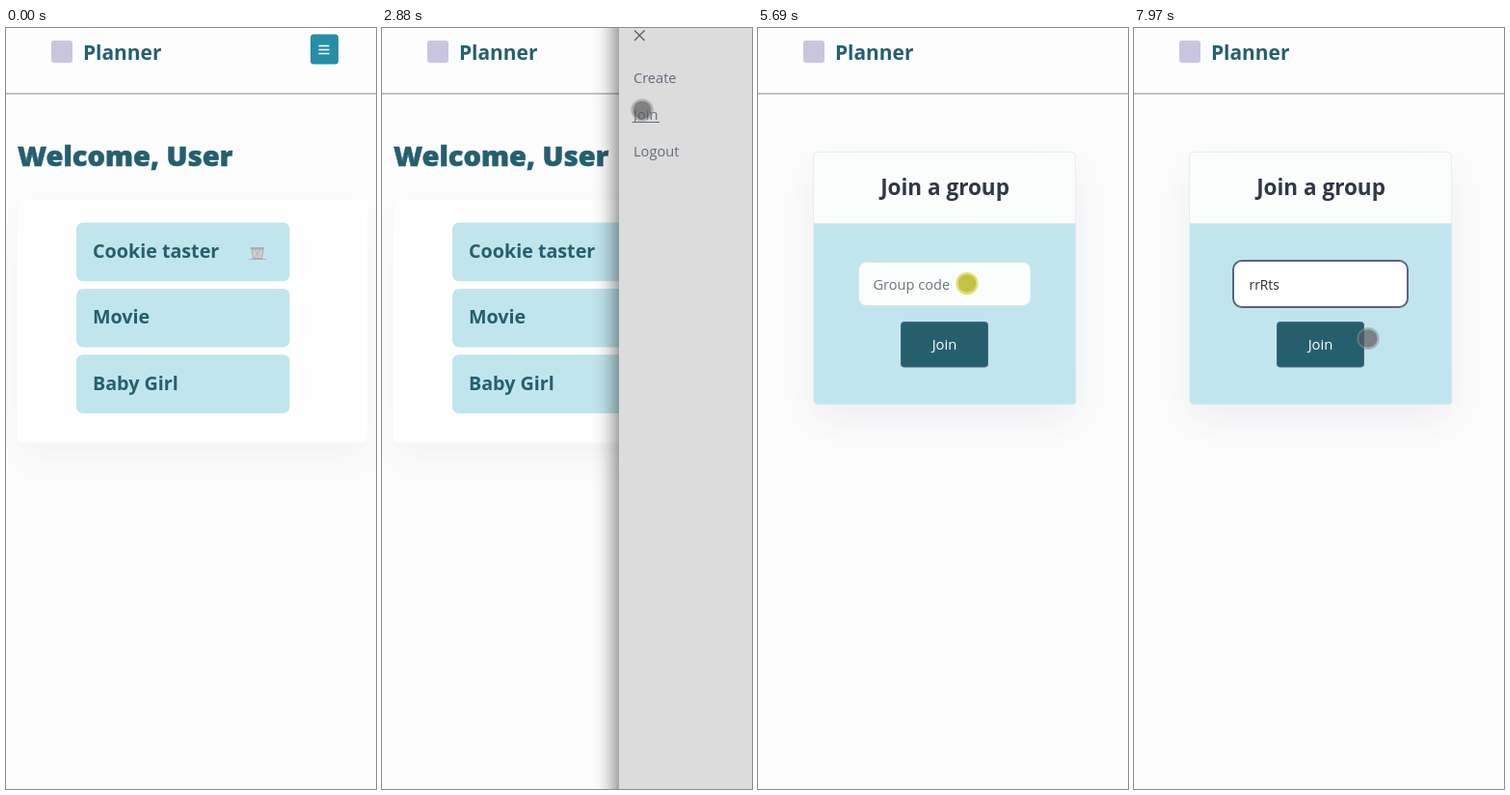
These frames come from a looping animation (384x788 px, 8000 ms). An HTML page:

```html
<!DOCTYPE html>
<html lang="en">
<head>
<meta charset="utf-8">
<title>Planner</title>
<style>
  html, body { margin: 0; width: 100%; height: 100%; overflow: hidden; background: #fdfdfd; }
  svg { display: block; width: 384px; height: 788px; font-family: "Open Sans", "Noto Sans", sans-serif; }
  .bold { font-weight: 700; fill: #255f6e; }
  .title { font-size: 29px; font-weight: 800; stroke: #255f6e; stroke-width: .6; }
  .item { font-size: 19.7px; }
  .menu { font-size: 14.6px; fill: #626c7c; }
  .rows text { font-size: 12.2px; font-weight: 600; fill: #2b3542; }
</style>
</head>
<body>
<svg viewBox="0 0 384 788">
  <defs>
    <filter id="soft" x="-30%" y="-30%" width="160%" height="170%"><feGaussianBlur stdDeviation="21"/></filter>
    <filter id="side" x="-50%" width="200%"><feGaussianBlur stdDeviation="13 0"/></filter>
    <filter id="lift" x="-10%" y="-10%" width="120%" height="130%">
      <feDropShadow dx="0" dy="1" stdDeviation="1.8" flood-color="#000" flood-opacity=".38"/>
    </filter>
  </defs>

  <rect width="384" height="788" fill="#fdfdfd"/>
  <rect x="47" y="13" width="22" height="23" rx="3" fill="#c9c5df"/>
  <text class="bold" x="80" y="33" font-size="20.9">Planner</text>
  <rect y="67.2" width="384" height="1.6" fill="#b3b6b9"/>

  <g id="home">
    <rect x="316" y="6.5" width="29" height="31" rx="3.5" fill="#268ea6"/>
    <path d="M324.5 18.500h11M324.500 22.500h11M324.500 26.500h11" stroke="#fff" stroke-width="1.400"/>
    <text class="bold title" x="12" y="143">Welcome, User</text>
    <rect x="12" y="195" width="363" height="250" rx="5" fill="#303070" opacity=".05" filter="url(#soft)"/>
    <rect x="12" y="179" width="363" height="250.500" rx="5" fill="#fefefe"/>
    <g id="items"></g>
    <g fill="none" stroke="#a9a9ac">
      <path d="M255 229l1.500 9.500h9l1.500-9.500z" fill="#d0cfd1"/>
      <path d="M254 228h14" stroke-width="1.800"/>
      <path d="M252 239.500h18" stroke="#b4aeb4"/>
      <path d="M258.500 230l4.500 7M263.500 230l-4.500 7" stroke-width=".8"/>
    </g>
  </g>

  <g id="panel">
    <rect x="246" y="-9" width="180" height="806" opacity=".7" filter="url(#side)"/>
    <rect x="246" width="138" height="788" fill="#dcdcdc"/>
    <path d="M262 2.500l10.500 10.500M272.500 2.500l-10.500 10.500" stroke="#4f5a6b" stroke-width="1.200"/>
    <g class="menu">
      <text x="261" y="57">Create</text>
      <text x="261" y="95">Join</text>
      <text x="261" y="133">Logout</text>
    </g>
    <rect id="line" x="261" y="97" width="27" height="1" fill="#626c7c"/>
  </g>

  <g id="join">
    <rect x="58" y="145" width="272" height="260" rx="5" fill="#303070" opacity=".08" filter="url(#soft)"/>
    <rect x="58" y="129" width="272" height="261" rx="4" fill="#c1e5ed"/>
    <path d="M58 203v-70q0-4 4-4h264q4 0 4 4v70z" fill="#fafdfc"/>
    <rect x="57.500" y="128.500" width="272" height="261" rx="4" fill="none" stroke="#dfe9ee" stroke-opacity=".7"/>
    <rect x="58" y="202" width="272" height="1" fill="#dce8eb"/>
    <text x="194" y="173" font-size="22.500" font-weight="700" fill="#2f3844" text-anchor="middle">Join a group</text>
    <rect id="field"/>
    <text id="value" x="119.500" y="271"></text>
    <rect id="caret" y="255" width="1" height="20" fill="#222"/>
    <rect x="148.500" y="304.500" width="90" height="46.500" rx="3" fill="#255f6d" stroke="#4a6484"/>
    <text x="193.500" y="333" font-size="14.800" fill="#fff" text-anchor="middle">Join</text>
    <g id="popup" class="rows">
      <path d="M191 314h5l8-8 8 8h119q8 0 8 8v100q0 8-8 8h-140q-8 0-8-8v-100q0-8 8-8z" fill="#fffaff" filter="url(#lift)"/>
      <g id="hover">
        <rect x="187" y="318" width="148" height="36" rx="4" fill="#f2eef2"/>
        <path d="M312.500 331.500l9 9M321.500 331.500l-9 9" stroke="#45474d" stroke-width="1.700"/>
      </g>
      <text x="195" y="341">fdsan</text>
      <text x="195" y="377">fsoAn</text>
      <text x="195" y="413">knmri</text>
    </g>
  </g>

  <g id="dot">
    <circle id="core" r="9.600"/>
    <circle id="ring" r="10.600" fill="none" stroke-width="2"/>
  </g>
  <path id="arrow" d="M0 0v15.500l3.600-3.300 2.700 6 2.700-1.200-2.700-5.700h5z" fill="#fff" stroke="#222" stroke-width="1.100"/>
</svg>
<script>
const LOOP = 8000, STEP = 67;
const $ = id => document.getElementById(id);
const show = (id, on) => $(id).style.display = on ? '' : 'none';
const within = (t, a, b) => t >= a && t < b;
const set = (el, attrs) => { for (const k in attrs) el.setAttribute(k, attrs[k]); };

$('items').innerHTML = ['Cookie taster', 'Movie', 'Baby Girl'].map((name, i) => {
  const y = 201.5 + i * 68.4;
  return `<rect x="73" y="${y}" width="221.5" height="60.7" rx="7" fill="#c1e5ed"/>
    <text class="bold item" x="90" y="${y + 36.5}">${name}</text>`;
}).join('');

// pointer moves: start, duration, end point
const entry = [355, 763];
const moves = [
  [70, 400, 301, 14],     // to the menu button
  [1200, 150, 328.5, 20.5],
  [1680, 460, 266, 104],  // down to Join
  [2240, 180, 270, 85],
  [3190, 160, 274.5, 93],
  [4220, 65, 266, 129],   // away from the menu
  [4290, 470, 248, 305],
  [4920, 240, 217, 264.5], // into the field
  [5890, 200, 216, 303],
  [6210, 80, 225, 343],   // over the suggestions
  [6320, 310, 359, 400],
  [6800, 500, 14.5, 277.5],
  [7340, 230, 307, 336.5],
  [7610, 350, 243, 321.5] // back to the button
];
const clicks = [1540, 3890, 5690];
const code = 'rrRts', typeFrom = 6840, typeEvery = 95;
const words = ['fdsan', 'fsoAn', 'knmri'];

const ease = k => k * k * (3 - 2 * k);

function pointer(t) {
  let [x, y] = entry;
  for (const [start, span, toX, toY] of moves) {
    const k = ease(Math.min(Math.max((t - start) / span, 0), 1));
    x += (toX - x) * k;
    y += (toY - y) * k;
  }
  return [x, y];
}

function draw(now) {
  const t = Math.floor((now % LOOP + 10) / STEP) * STEP;
  const [x, y] = pointer(t);
  const onJoin = t >= 4350;
  const popup = within(t, 5890, typeFrom - 10);
  const row = popup && t >= 6220 && x < 339 ? Math.floor((y - 318) / 36) : -1;
  const hovered = row >= 0;
  const typed = code.slice(0, Math.max(0, Math.ceil((t + 10 - typeFrom) / typeEvery)));
  const click = clicks.some(c => within(t, c - 10, c + 100));

  show('home', !onJoin);
  show('panel', within(t, 1600, 4350));
  show('line', t >= 2000);
  show('join', onJoin);
  show('popup', popup);
  show('hover', hovered);
  show('caret', typed && t < 7500);
  show('dot', t >= 130 && !hovered);
  show('arrow', hovered);

  set($('field'), t >= 5750
    ? { x: 103, y: 241, width: 181, height: 48, rx: 9, fill: hovered ? '#fafbff' : '#fff', stroke: '#5a6283', 'stroke-width': 2 }
    : { x: 104.5, y: 242.5, width: 178.5, height: 45, rx: 8, fill: '#fbfdfd', stroke: '#dbe3ea', 'stroke-width': 1 });

  const value = $('value');
  value.textContent = typed || words[row] || 'Group code';
  set(value, {
    fill: typed || hovered ? '#262c36' : '#6b737b',
    'font-size': hovered ? 12.3 : typed ? 13.8 : 14.6
  });
  if (typed) $('caret').setAttribute('x', 119.5 + value.getComputedTextLength());

  $('hover').setAttribute('transform', `translate(0 ${Math.max(row, 0) * 36})`);
  $(hovered ? 'arrow' : 'dot').setAttribute('transform', `translate(${x} ${y})`);
  $('core').setAttribute('fill', click ? 'rgba(178,172,10,.75)' : 'rgba(90,90,90,.7)');
  $('ring').setAttribute('stroke', click ? 'rgba(218,214,60,.75)' : 'rgba(140,140,140,.55)');
}

function tick() {
  draw(performance.now());
  requestAnimationFrame(tick);
}
tick();
</script>
</body>
</html>
```
